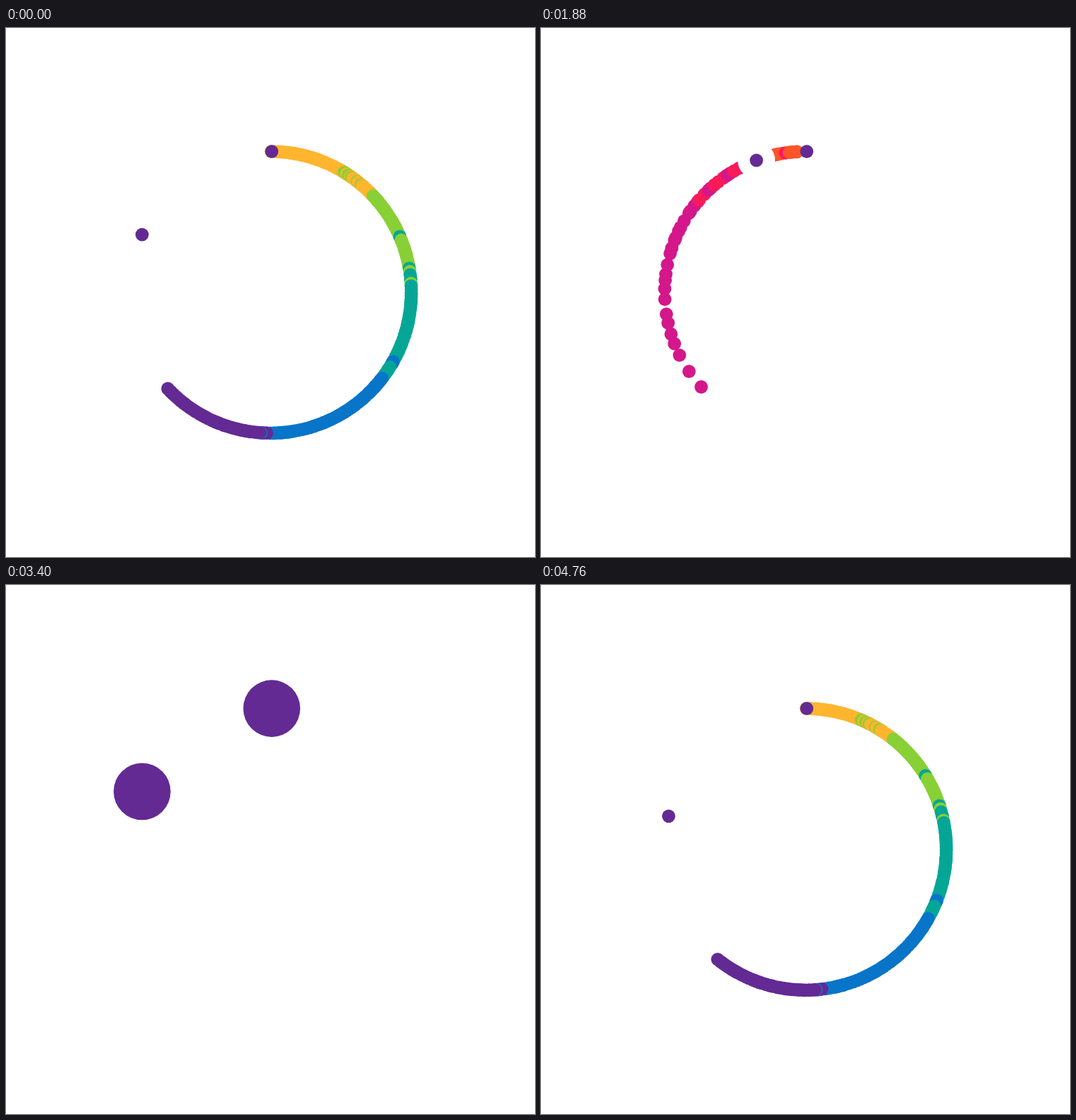
These frames come from a looping animation (748 px wide and 748 px high, 4800 ms). An HTML page with a canvas:

```html
<!DOCTYPE html>
<html lang="en">
<head>
<meta charset="utf-8">
<title>Orbit trail</title>
<style>
  html, body { margin: 0; width: 100%; height: 100%; overflow: hidden; background: #fff; }
  canvas { display: block; }
</style>
</head>
<body>
<canvas id="stage" width="748" height="748"></canvas>
<script>
const ctx = document.getElementById('stage').getContext('2d');
const LOOP = 4800, STEP = 40;
const CX = 374, CY = 373.7, ORBIT = 199.1;
const SMALL = 9.4, BIG = 40.3, GAP = 26.5;
const COLORS = ['#642a94', '#0875c9', '#06a696', '#88d036', '#ffb52e', '#ff5429', '#fa1a5a', '#d4178a'];
const BAND_ENDS = [45, 102, 150, 189, 243, 263, 305]; // degrees behind the tip
const TRAIL_LENGTH = 394;

let seed = 7;
const random = () => (seed = seed * 16807 % 2147483647) / 2147483647;
const clamp = (v, lo, hi) => Math.min(hi, Math.max(lo, v));

// Colours mix more, and beads spread out, towards the end of the trail
const beads = [];
for (let offset = 0; offset < TRAIL_LENGTH;) {
  const mixed = offset + (random() - 0.5) * 0.15 * offset;
  const band = BAND_ENDS.filter(end => mixed > end).length;
  beads.unshift({ offset, color: COLORS[band] }); // leading beads lie on top
  offset += (1 + 7 * (offset / 380) ** 8) * (0.4 + 1.2 * random());
}

function disc(degrees, radius, color) {
  const a = degrees * Math.PI / 180;
  ctx.fillStyle = color;
  ctx.beginPath();
  ctx.arc(CX + ORBIT * Math.sin(a), CY - ORBIT * Math.cos(a), radius, 0, 2 * Math.PI);
  ctx.fill();
}

function draw(t) {
  ctx.fillStyle = '#fff';
  ctx.fillRect(0, 0, 748, 748);

  const grown = clamp((t - 2035) / 522, 0, 1) - clamp((t - 3694) / 700, 0, 1);
  const radius = SMALL + (BIG - SMALL) * grown;

  // Beads leave the top disc and vanish once their centre is back inside it
  const tip = 226.8 + 0.2055 * (t > 3400 ? t - LOOP : t);
  const absorbed = 360 - radius / ORBIT * 180 / Math.PI;
  for (const { offset, color } of beads) {
    const angle = tip - offset;
    if (angle > 0 && angle < absorbed) disc(angle, SMALL, color);
  }

  // The orbiter runs fast, then slower through the middle of the loop
  const orbiter = 294.2 + 0.2654 * t - 0.0584 * clamp(t - 278, 0, 3320);
  disc(orbiter, GAP, '#fff');
  disc(orbiter, radius, COLORS[0]);
  disc(0.5, radius, COLORS[0]);
}

const start = performance.now();
function tick() {
  const t = (performance.now() - start) % LOOP;
  draw(Math.floor(t / STEP) * STEP);
  requestAnimationFrame(tick);
}
tick();
</script>
</body>
</html>
```
